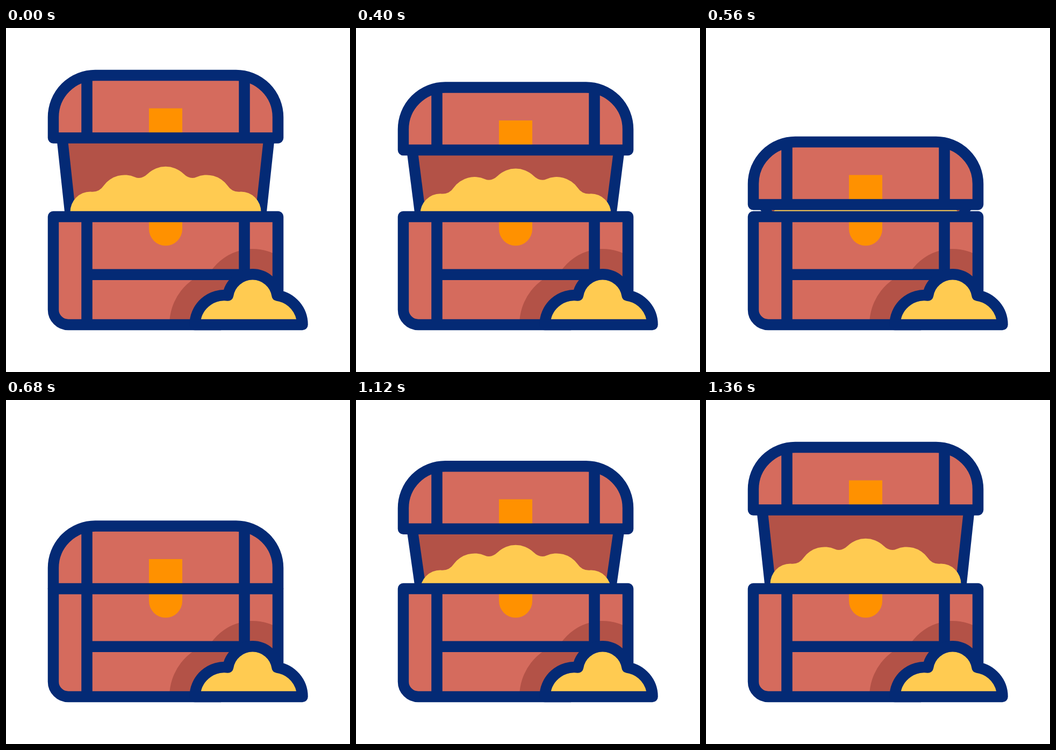
Write an HTML page that moves like this. It is 640 px wide and 640 px high and loops after 2.8 s.

```html
<!DOCTYPE html>
<html lang="en">
<head>
<meta charset="utf-8">
<title>Treasure chest</title>
<style>
  html, body { margin: 0; width: 100%; height: 100%; overflow: hidden; background: #fff; }
  svg { display: block; width: 100vw; height: 100vh; }
  .line { fill: none; stroke: #042a75; stroke-width: 20.5; stroke-linejoin: round; }
  .navy { fill: #042a75; }
  .red { fill: #d56b5d; }
  .dark { fill: #b35247; }
  .orange { fill: #ff9100; }
  .gold { fill: #ffcb51; }
</style>
</head>
<body>
<svg viewBox="0 0 640 640">
  <path id="rim" class="navy"/>
  <path id="inside" class="dark"/>
  <path id="coins" class="gold" d="M119.5 342A37.5 37.5 0 0 1 157 304.5Q173 306.5 182 293A48 48 0 0 1 240 277.5
    Q252 282.5 264 271A48 48 0 0 1 330 271Q342 282.5 354 277.5A48 48 0 0 1 412 293
    Q421 306.5 437 304.5A37.5 37.5 0 0 1 474.5 342V400H119.5Z"/>

  <g id="box">
    <path class="red" d="M88 351H506V552H116A28 28 0 0 1 88 524Z"/>
    <path class="dark" d="M304 552A102.5 102.5 0 0 1 381 452.6A94 94 0 0 1 506 423.6V552Z"/>
    <path class="orange" d="M266 351H328V374A31 31 0 0 1 266 374Z"/>
    <path class="line" d="M506 510V351H88V524A28 28 0 0 0 116 552H400M150.5 351V552M443.5 351V470M150.5 458.75H440"/>
    <path class="line" style="fill:#ffcb51" d="M351.5 552A55 55 0 0 1 413 497.5A46.3 46.3 0 0 1 504.5 497.5A55 55 0 0 1 551.5 552Z"/>
  </g>

  <g id="lid">
    <path id="shell" class="red" d="M88 204.5V166A78 78 0 0 1 166 88H428A78 78 0 0 1 506 166V204.5Z"/>
    <path class="orange" d="M266 149.5H328V204H266Z"/>
    <path class="line" d="M88 204.5V166A78 78 0 0 1 166 88H428A78 78 0 0 1 506 166V204.5ZM150.5 88V204M443.5 88V204"/>
  </g>
</svg>
<script>
const LOOP = 2800, STEP = 40;
const LID_DROP = 146.5, LID_OVERSHOOT = -13, COIN_DROP = 24;
const el = id => document.getElementById(id);

// Symmetric cubic-bezier(w, 0, 1 - w, 1), solved by bisection.
function ease(x, w = 0.52) {
  if (x <= 0) return 0;
  if (x >= 1) return 1;
  let lo = 0, hi = 1, s;
  for (let i = 0; i < 24; i++) {
    s = (lo + hi) / 2;
    const r = 1 - s;
    if (3 * w * s * r * r + 3 * (1 - w) * s * s * r + s ** 3 < x) lo = s;
    else hi = s;
  }
  return s * s * (3 - 2 * s);
}

// Keys are [start, end, change] moves that add up.
const track = (t, moves) =>
  moves.reduce((sum, [a, b, change]) => sum + change * ease((t - a) / (b - a)), 0);

const lidMoves = [
  [280, 680, LID_DROP],
  [1000, 1200, LID_OVERSHOOT - LID_DROP],
  [1200, 1360, -LID_OVERSHOOT]
];
const coinMoves = [
  [280, 680, COIN_DROP],
  [1000, 1240, -COIN_DROP]
];

// Back wall: stretches between the lid and the box.
const wall = (y, inset) =>
  `M${94.2 + inset} ${y}H${499.8 - inset}L${484 - inset} 351H${110 + inset}Z`;

function draw(now) {
  const t = Math.floor((now % LOOP) / STEP) * STEP;
  const lid = track(t, lidMoves);
  el('lid').setAttribute('transform', `translate(0 ${lid})`);
  el('coins').setAttribute('transform', `translate(0 ${track(t, coinMoves)})`);
  el('rim').setAttribute('d', wall(204.5 + lid, 0));
  el('inside').setAttribute('d', wall(204.5 + lid, 20.5));
}

let start;
function tick(now) {
  start ??= now;
  draw(now - start);
  requestAnimationFrame(tick);
}
draw(0);
requestAnimationFrame(tick);
</script>
</body>
</html>
```
